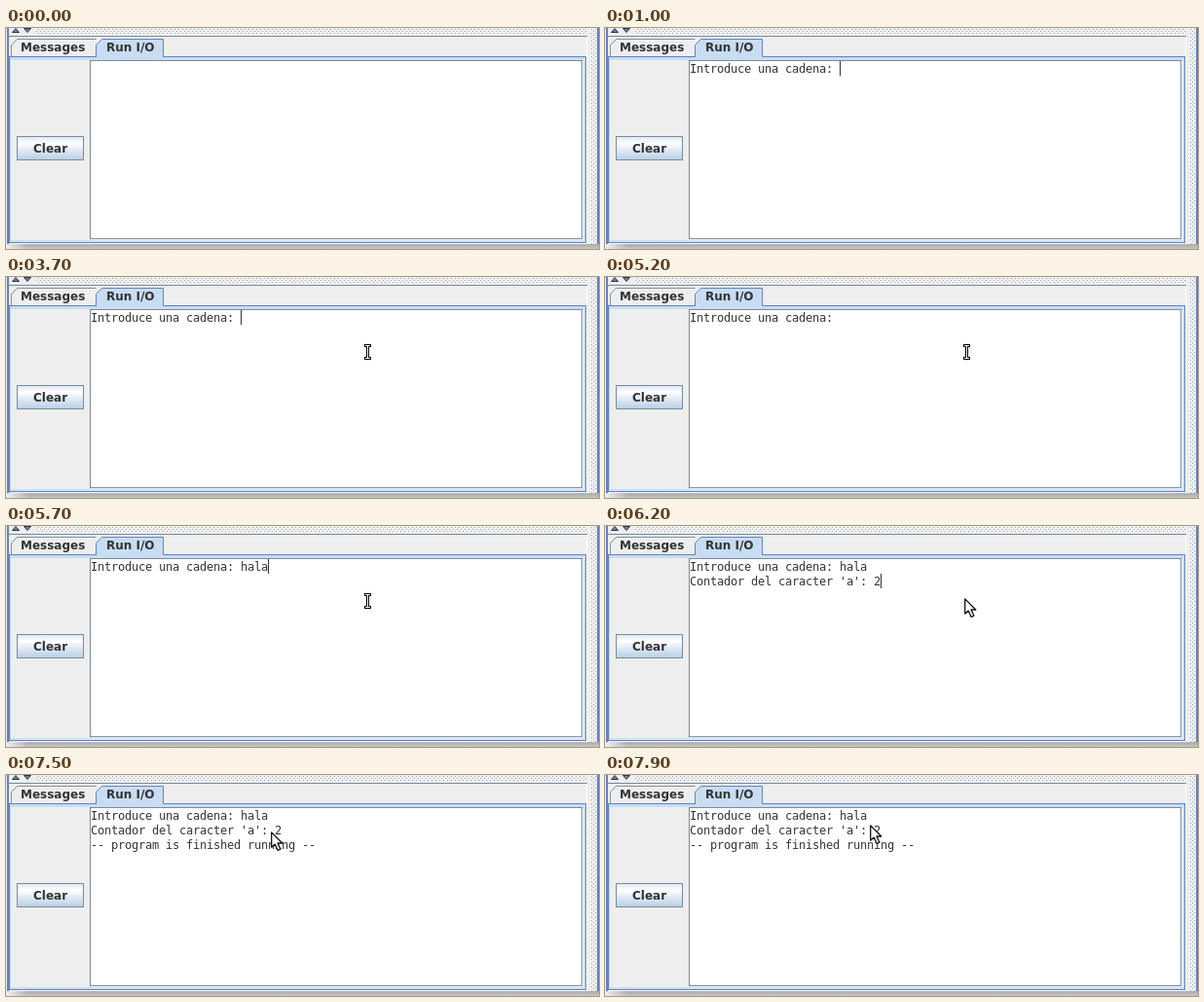
An HTML page for the animation above (8000 ms loop, 609 px wide and 227 px high).

```html
<!DOCTYPE html>
<html lang="es">
<head>
<meta charset="utf-8">
<title>Run I/O</title>
<style>
  html, body { margin: 0; width: 100%; height: 100%; overflow: hidden; background: #eee; }
  svg { display: block; width: 609px; height: 227px; }
  text { fill: #333; white-space: pre; }
  .label { font: bold 12px "DejaVu Sans", sans-serif; }
  .console { font: 12px "DejaVu Sans Mono", monospace; letter-spacing: calc(7px - 1ch); }
  .crisp { shape-rendering: crispEdges; }
  .edge { fill: none; stroke: #7a8a99; }
  .accent { fill: none; stroke: #6382bf; }
  .light { fill: none; stroke: #fff; }
</style>
</head>
<body>
<svg viewBox="0 0 609 227">
  <defs>
    <pattern id="bumps" width="4" height="4" patternUnits="userSpaceOnUse">
      <path fill="#fff" d="M0 0h1v1h-1zM2 2h1v1h-1z"/>
      <path fill="#94a3b3" d="M1 1h1v1h-1zM3 3h1v1h-1z"/>
    </pattern>
    <linearGradient id="button" x2="0" y2="1">
      <stop stop-color="#dde8f3"/>
      <stop offset=".3" stop-color="#fff"/>
      <stop offset=".6" stop-color="#dde8f3"/>
      <stop offset="1" stop-color="#b8cfe5"/>
    </linearGradient>
    <linearGradient id="shadow" x2="0" y2="1">
      <stop stop-color="#aaa"/>
      <stop offset="1" stop-color="#c6c6c6"/>
    </linearGradient>
    <linearGradient id="fade">
      <stop stop-color="#eee"/>
      <stop offset="1" stop-color="#eee" stop-opacity="0"/>
    </linearGradient>
  </defs>

  <g class="crisp">
    <rect width="609" height="227" fill="#eee"/>
    <!-- split pane dividers -->
    <rect x="30" y="1" width="566" height="6" fill="url(#bumps)"/>
    <rect x="600" width="6" height="222" fill="url(#bumps)"/>
    <rect x="607" width="2" height="222" fill="#6382bf"/>
    <rect x="1" width="2" height="222" fill="#6382bf"/>
    <path class="edge" d="M3 8.5H597"/>
    <path class="light" d="M596.5 9V221.5H3"/>
    <!-- content area -->
    <rect x="3" y="29" width="593" height="192" fill="#c8ddf2"/>
    <rect x="5" y="33" width="81" height="185" fill="#eee"/>
    <path class="accent" d="M3.5 29.5H595.5V220.5H3.5z"/>
    <rect class="edge" x="86.5" y="33.5" width="505" height="183" style="fill:#fff"/>
    <path class="light" d="M592.5 34V217.5H87"/>
    <!-- window shadow -->
    <rect y="222" width="609" height="5" fill="url(#shadow)"/>
    <rect y="222" width="22" height="5" fill="url(#fade)"/>
    <rect class="edge" x="11.5" y="111.5" width="68" height="24" style="fill:url(#button)"/>
  </g>

  <path fill="#6382bf" stroke="#333" d="M6.5 4.5L10 .5L13.5 4.5zM18.5 .5H25.5L22 4.5z"/>
  <path class="edge" d="M5.5 29V17.5L11.5 11.5H92.5" style="fill:#eee"/>
  <path class="light" d="M6.5 29V17.5L11.5 12.5H92"/>
  <path fill="#c8ddf2" d="M93 31V17.5L99 11.5H161.5V31z"/>
  <path class="accent" d="M92.5 29.5V17.5L98.5 11.5H161.5V29.5"/>

  <text class="label" x="15" y="24">Messages</text>
  <text class="label" x="103" y="24">Run I/O</text>
  <text class="label" x="28" y="128">Clear</text>

  <g id="lines" class="console">
    <text x="87" y="46"></text>
    <text x="87" y="61"></text>
    <text x="87" y="76"></text>
  </g>
  <rect id="caret" class="crisp" width="1" height="15" fill="#333"/>
  <g id="beam" class="crisp" fill="none">
    <path stroke="#000" stroke-width="3" d="M-3 -6.5H4M-3 6.5H4M.5 -7V7"/>
    <path stroke="#fff" d="M-2 -6.5H3M-2 6.5H3M.5 -7V7"/>
  </g>
  <path id="arrow" fill="#fff" stroke="#111" stroke-width="1.3" stroke-linejoin="round"
        d="M.7 .9V16.2L4.2 13.1L7.1 19.5L9.9 18.2L7 12H11.8z"/>
</svg>
<script>
  const LOOP = 8000, CHAR = 7, LEFT = 87, TOP = 34, LINE = 15;
  const PROMPT = 'Introduce una cadena: ';
  const RESULT = "Contador del caracter 'a': 2";
  const FINISHED = '-- program is finished running --';

  // Each track is a list of [start time, value]; values hold until the next step.
  const output = [
    [0, []],
    [1000, [PROMPT]],
    [5400, [PROMPT + 'ha']],
    [5600, [PROMPT + 'hal']],
    [5700, [PROMPT + 'hala']],
    [6200, [PROMPT + 'hala', RESULT]],
    [6500, [PROMPT + 'hala', RESULT, FINISHED]]
  ];
  const caretOn = [
    [0, false], [1000, true], [1200, false], [1700, true], [2200, false],
    [2700, true], [3300, false], [3700, true], [4400, false], [4700, true],
    [5200, false], [5400, true], [6500, false]
  ];
  const pointer = [
    [0, null],
    [1600, ['beam', 401, 67]], [1700, ['beam', 380, 75]], [1800, ['beam', 371, 77]],
    [6200, ['arrow', 369, 74]],
    [7200, ['arrow', 359, 69]], [7300, ['arrow', 328, 65]], [7400, ['arrow', 297, 61]],
    [7500, ['arrow', 272, 58]], [7600, ['arrow', 261, 57]],
    [7800, ['arrow', 267, 54]], [7900, ['arrow', 272, 51]]
  ];

  const byId = id => document.getElementById(id);
  const rows = [...byId('lines').children];
  const caret = byId('caret');
  const pointers = [byId('beam'), byId('arrow')];
  const at = (track, time) => track.findLast(([start]) => start <= time)[1];
  const show = (el, visible) => el.setAttribute('visibility', visible ? 'visible' : 'hidden');

  function draw(time) {
    const text = at(output, time);
    rows.forEach((row, i) => {
      const value = text[i] || '';
      if (row.textContent !== value) row.textContent = value;
    });

    const last = Math.max(text.length - 1, 0);
    caret.setAttribute('x', LEFT + CHAR * (text[last] || '').length);
    caret.setAttribute('y', TOP + LINE * last);
    show(caret, at(caretOn, time));

    const [shape, x, y] = at(pointer, time) || [];
    for (const el of pointers) {
      show(el, el.id === shape);
      if (el.id === shape) el.setAttribute('transform', `translate(${x} ${y})`);
    }
  }

  const origin = performance.now();
  function tick() {
    draw((performance.now() - origin) % LOOP);
    requestAnimationFrame(tick);
  }
  tick();
</script>
</body>
</html>
```
